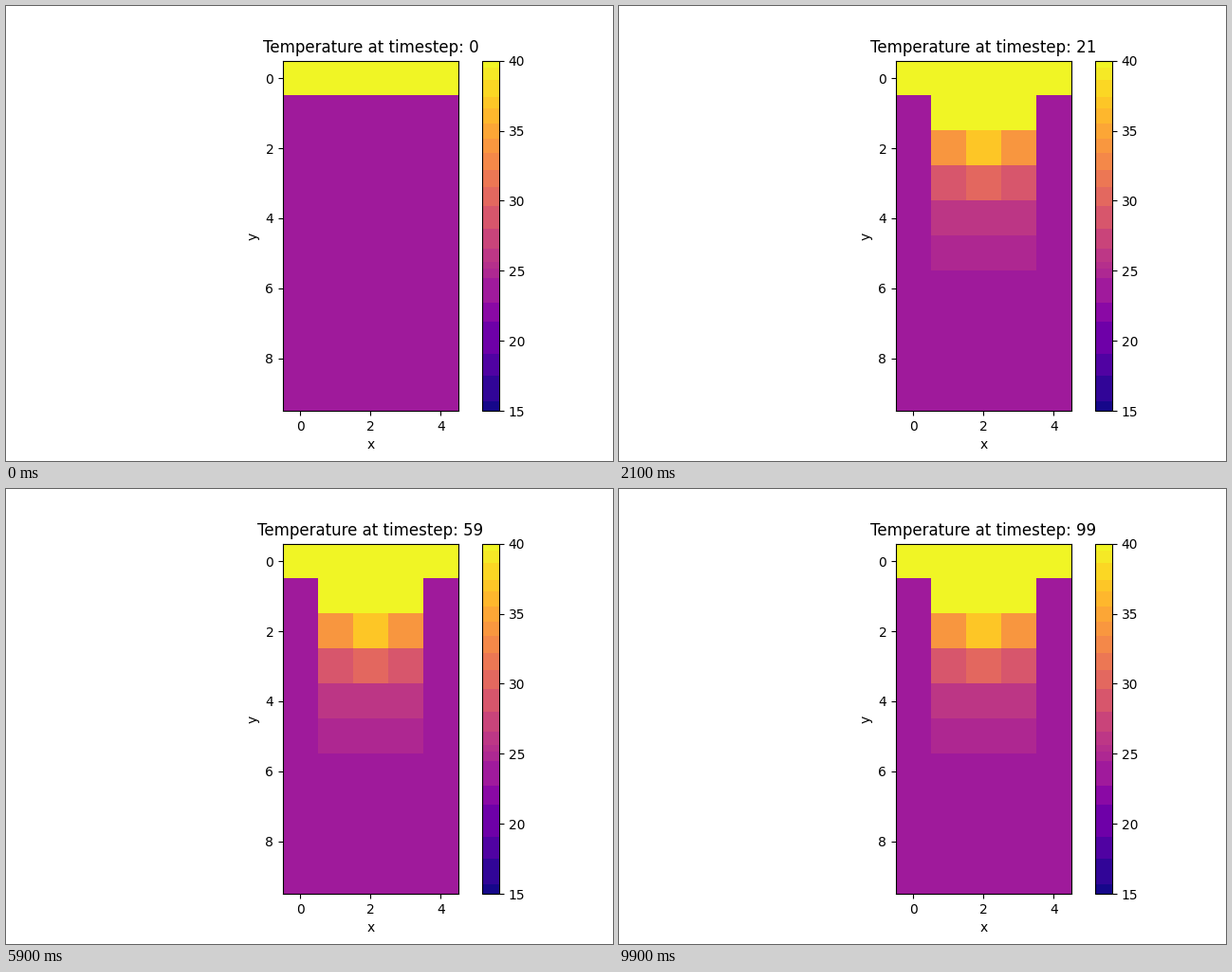
Recreate the animation shown at these times as a matplotlib script. Size 640 by 480 pixels, loop 10000 ms.

```python
import numpy as np
import matplotlib.pyplot as plt
from matplotlib.animation import FuncAnimation
from matplotlib.colors import ListedColormap

STEPS = 100
VMIN, VMAX = 15, 40
AMBIENT, HOT = 24.0, 86.0
ALPHA, LOSS = 0.18, 0.17

# Edges of the flat colour bands, in degrees
BANDS = np.array([15, 15.7, 17.55, 19.1, 21.4, 22.75, 24.5, 25.15, 25.6,
                  26.6, 28, 29.65, 30.95, 32.2, 33.4, 34.45, 35.5, 36.6,
                  37.4, 38.6, 39.5, 40])


def banded_plasma(n=1000):
    values = VMIN + (np.arange(n) + 0.5) / n * (VMAX - VMIN)
    mids = (BANDS[:-1] + BANDS[1:]) / 2
    band = np.searchsorted(BANDS, values, side="right") - 1
    return ListedColormap(plt.cm.plasma((mids[band] - VMIN) / (VMAX - VMIN)))


def simulate():
    """Heat a plate from its top row; the other edges stay at ambient."""
    t = np.full((10, 5), AMBIENT)
    t[0] = HOT
    states = [t.copy()]
    for _ in range(STEPS - 1):
        core = t[1:-1, 1:-1]
        flow = (t[:-2, 1:-1] + t[2:, 1:-1] + t[1:-1, :-2] + t[1:-1, 2:]
                - 4 * core - LOSS * (core - AMBIENT))
        t[1:-1, 1:-1] = core + ALPHA * flow
        states.append(t.copy())
    return states


states = simulate()

fig, ax = plt.subplots(figsize=(6.4, 4.8), dpi=100)
image = ax.imshow(states[0], cmap=banded_plasma(), vmin=VMIN, vmax=VMAX,
                  interpolation="nearest")
fig.colorbar(image, ax=ax, ticks=range(VMIN, VMAX + 1, 5))
ax.set_xticks([0, 2, 4])
ax.set_yticks([0, 2, 4, 6, 8])
ax.set_xlabel("x")
ax.set_ylabel("y")
title = ax.set_title("")


def update(step):
    image.set_data(states[step])
    title.set_text(f"Temperature at timestep: {step}")
    return image, title


anim = FuncAnimation(fig, update, frames=STEPS, interval=100, repeat=True,
                     repeat_delay=0)
plt.show()
```
